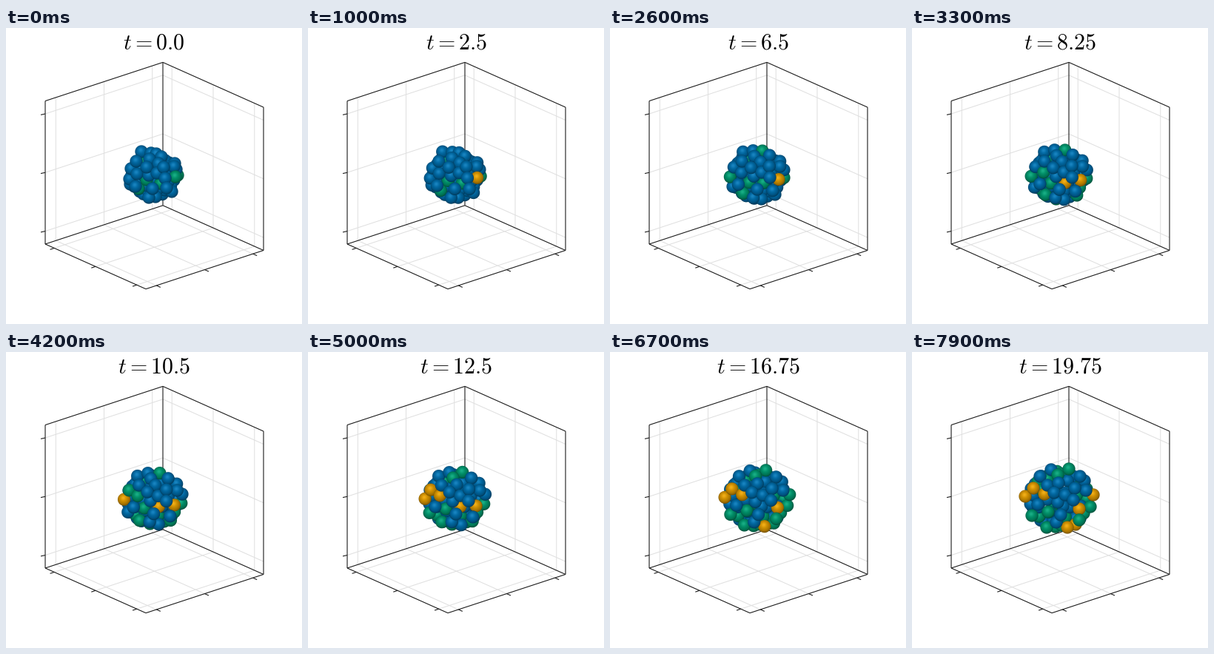
A matplotlib script that plays this animation: 400 px wide and 400 px high, repeating every 8000 ms.

```python
import numpy as np
import matplotlib.pyplot as plt
from matplotlib.animation import FuncAnimation

plt.rcParams["mathtext.fontset"] = "cm"
plt.rcParams["path.snap"] = False

SIZE, FRAMES, STEP = 400, 80, 100
RADIUS = 8.6
COLORS = np.array([[0, 114, 178], [0, 158, 115], [230, 159, 0]]) / 255
BLUE, GREEN = "blue", "green"

# Front cells from back to front: start, end, first state, frames of each state change
CELLS = [
    ((232, 199), (241, 209), GREEN, ()),
    ((224, 221), (221, 233), BLUE, (28, 73)),
    ((202, 228), (210, 237), BLUE, (52, 62)),
    ((179, 217), (182, 237), GREEN, ()),
    ((168, 211), (162, 221), BLUE, (50,)),
    ((193, 229), (195, 230), BLUE, ()),
    ((183, 167), (173, 168), BLUE, ()),
    ((196, 169), (188, 159), BLUE, ()),
    ((203, 170), (212, 158), BLUE, (15,)),
    ((230, 191), (245, 193), BLUE, (63, 74)),
    ((228, 183), (233, 174), BLUE, ()),
    ((227, 187), (235, 187), BLUE, ()),
    ((210, 174), (227, 168), BLUE, ()),
    ((194, 177), (197, 166), BLUE, (50,)),
    ((229, 201), (226, 212), GREEN, (10,)),
    ((167, 204), (153, 195), BLUE, (15, 40)),
    ((209, 210), (204, 208), GREEN, (30, 62)),
    ((190, 205), (184, 216), GREEN, ()),
    ((175, 214), (170, 206), BLUE, ()),
    ((169, 190), (164, 184), BLUE, (36, 50)),
    ((177, 197), (179, 192), BLUE, (28, 50)),
    ((176, 180), (183, 180), BLUE, ()),
    ((206, 183), (198, 177), BLUE, ()),
    ((193, 199), (197, 203), BLUE, ()),
    ((190, 188), (192, 190), BLUE, ()),
    ((204, 196), (207, 193), BLUE, ()),
    ((213, 188), (220, 184), BLUE, ()),
    ((215, 203), (218, 200), BLUE, ()),
    ((217, 216), (226, 227), BLUE, (62,)),
    ((198, 217), (201, 220), BLUE, ()),
]

# Inner cells on a growing ball, sorted by depth
rng = np.random.default_rng(4)
N_INNER = 64
k = np.arange(N_INNER) + 0.5
depth = -1 + 2 * k / N_INNER
ring = np.sqrt(1 - depth ** 2)
turn = k * np.pi * (3 - 5 ** 0.5)
inner = np.column_stack([ring * np.cos(turn), ring * np.sin(turn)])
inner_flip = rng.uniform(-10, 170, N_INNER)

fig = plt.figure(figsize=(4, 4), dpi=100, facecolor="white")
ax = fig.add_axes([0, 0, 1, 1])
ax.axis("off")

# Box: an origin corner at the back bottom and three edge vectors
BACK = np.array([212.0, 239.8])
EDGE_X = np.array([136.0, 60.7])
EDGE_Y = np.array([-159.0, 52.2])
EDGE_Z = np.array([0, -193.4])
INK, GRID = "#1c1c1c", "#e0e0e0"


def line(p, vec, color=INK, width=0.8, z=2):
    q = p + vec
    ax.plot([p[0], q[0]], [p[1], q[1]], color=color, lw=width,
            zorder=z, solid_capstyle="butt", snap=False)


def draw_box():
    edges = (EDGE_X, EDGE_Y, EDGE_Z)
    for i, along in enumerate(edges):
        for other in edges[:i] + edges[i + 1:]:
            for f in (0.09, 0.5, 0.91):
                line(BACK + f * along, other, GRID, 0.75, 1)
            line(BACK + other, along)
        line(BACK, along)
    for along, out in ((EDGE_X, EDGE_Y), (EDGE_Y, EDGE_X)):
        for f in (0.09, 0.5, 0.91):
            line(BACK + out + f * along, 6 * out / np.hypot(*out))
    for f in (0.09, 0.5, 0.91):
        line(BACK + EDGE_Y + f * EDGE_Z, np.array([-6, 1.3]))


draw_box()
title = ax.text(200.3, 28.2, "", fontsize=21.6, ha="center", va="baseline")

# Canvas for the cells
X0, Y0, W, H = 130, 130, 140, 130
canvas = ax.imshow(np.zeros((H, W, 4)), extent=(X0, X0 + W, Y0 + H, Y0),
                   interpolation="nearest", zorder=3, aspect="auto")
ax.set(xlim=(0, SIZE), ylim=(SIZE, 0))

LIGHT = np.array([-0.12, -0.25, 0.96])
LIGHT /= np.linalg.norm(LIGHT)


def stamp(img, x, y, state):
    """Blend one shaded ball into a premultiplied RGBA image."""
    left, top = int(x - X0 - RADIUS) - 1, int(y - Y0 - RADIUS) - 1
    n = int(2 * RADIUS) + 4
    v, u = np.mgrid[top:top + n, left:left + n] + 0.5
    u, v = (u + X0 - x) / RADIUS, (v + Y0 - y) / RADIUS
    r = np.hypot(u, v)
    alpha = np.clip((1 - r) * RADIUS + 0.5, 0, 1)[..., None]
    w = np.sqrt(np.clip(1 - r ** 2, 0, 1))
    lit = np.clip(u * LIGHT[0] + v * LIGHT[1] + w * LIGHT[2], 0, 1)
    shade = (0.5 + 0.44 * lit)[..., None]
    shine = (0.1 * lit ** 14)[..., None]
    rgb = np.clip(COLORS[state] * shade + shine, 0, 1)
    part = img[top:top + n, left:left + n]
    part *= 1 - alpha
    part += np.concatenate([rgb, np.ones_like(alpha)], axis=2) * alpha


def update(i):
    s = i / (FRAMES - 1)
    img = np.zeros((H, W, 4))
    center = np.array([198.5, 200 - 1.5 * s])
    reach = np.array([29 + 11.5 * s, 27.5 + 10.5 * s])
    for p, flip in zip(inner, inner_flip):
        stamp(img, *(center + p * reach), int(i >= flip))
    for start, end, first, flips in CELLS:
        state = (first == GREEN) + sum(i >= f for f in flips)
        pos = (1 - s) * np.array(start) + s * np.array(end)
        stamp(img, *pos, state % 3)
    img[..., :3] /= np.maximum(img[..., 3:], 1e-6)
    canvas.set_data(np.clip(img, 0, 1))
    title.set_text(f"$t = {i * 0.25}$")
    return canvas, title


anim = FuncAnimation(fig, update, frames=FRAMES, interval=STEP,
                     repeat=True, repeat_delay=0, blit=False)
plt.show()
```
